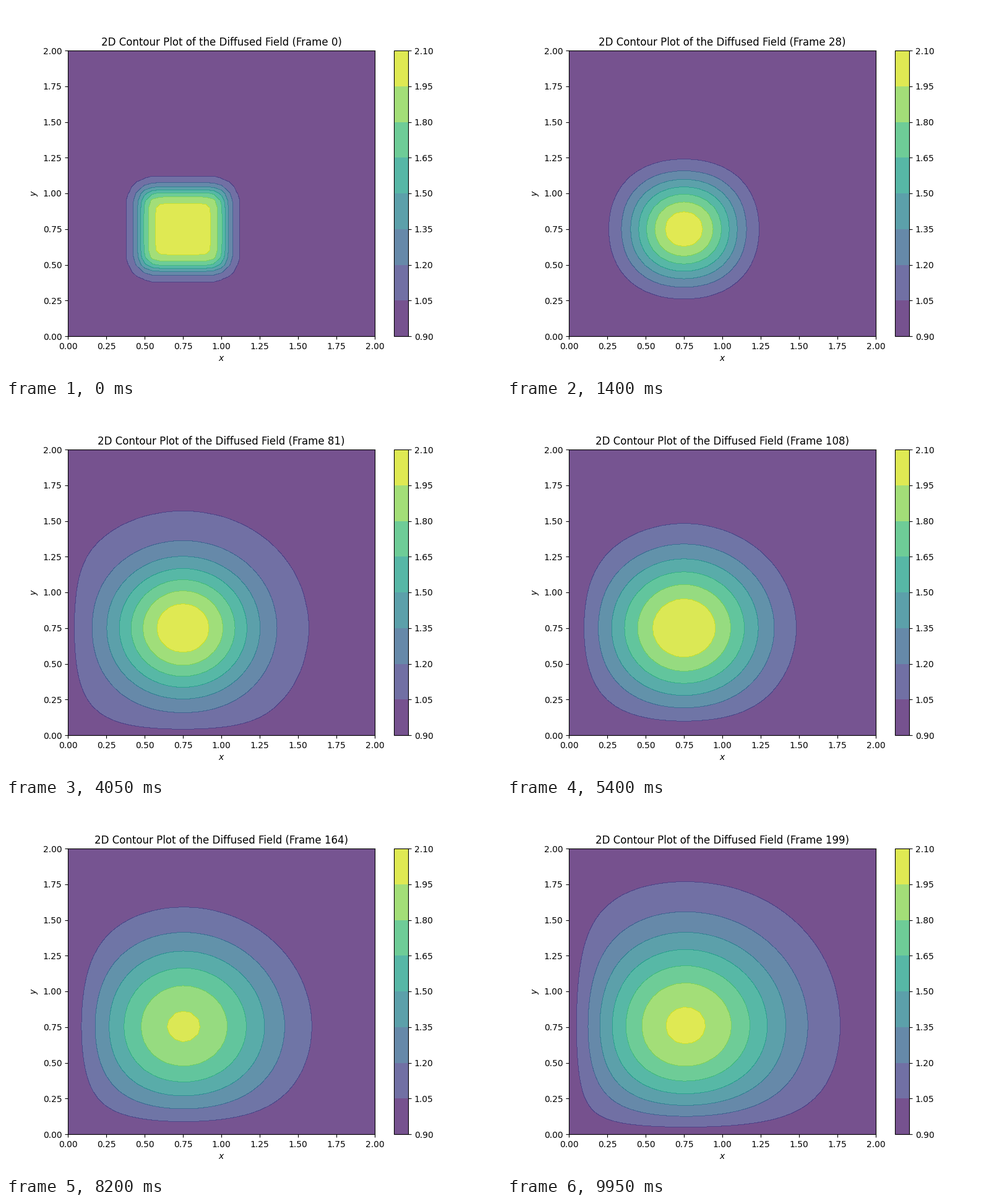
Recreate the animation shown at these times as a matplotlib script. Size 800 by 600 pixels, loop 10 s.

```python
import numpy as np
import matplotlib.pyplot as plt
from matplotlib.animation import FuncAnimation

FRAMES = 200
INTERVAL = 50
N = 41            # grid points per side
SIGMA = 0.2       # nu * dt / dx**2
WARMUP = 3        # steps taken before the first picture


def step(u):
    """One explicit diffusion step; the borders stay at 1."""
    new = u.copy()
    mid = u[1:-1, 1:-1]
    new[1:-1, 1:-1] = (mid
                       + SIGMA * (u[1:-1, 2:] - 2 * mid + u[1:-1, :-2])
                       + SIGMA * (u[2:, 1:-1] - 2 * mid + u[:-2, 1:-1]))
    return new


def simulate():
    u = np.ones((N, N))
    u[10:21, 10:21] = 2
    for _ in range(WARMUP):
        u = step(u)
    fields = [u]
    while len(fields) < FRAMES:
        fields.append(step(fields[-1]))
    return fields


fields = simulate()
x = np.linspace(0, 2, N)
X, Y = np.meshgrid(x, x)

fig, ax = plt.subplots(figsize=(8, 6), dpi=100)


def fill(i):
    return ax.contourf(X, Y, fields[i], cmap="viridis", alpha=0.75)


bands = fill(0)
fig.colorbar(bands)
ax.set_xlabel("$x$")
ax.set_ylabel("$y$")
title = ax.set_title("")


def animate(i):
    global bands
    bands.remove()
    bands = fill(i)
    title.set_text(f"2D Contour Plot of the Diffused Field (Frame {i})")
    return [bands, title]


anim = FuncAnimation(fig, animate, frames=FRAMES, interval=INTERVAL,
                     init_func=lambda: [], repeat=True, repeat_delay=0)

plt.show()
```
